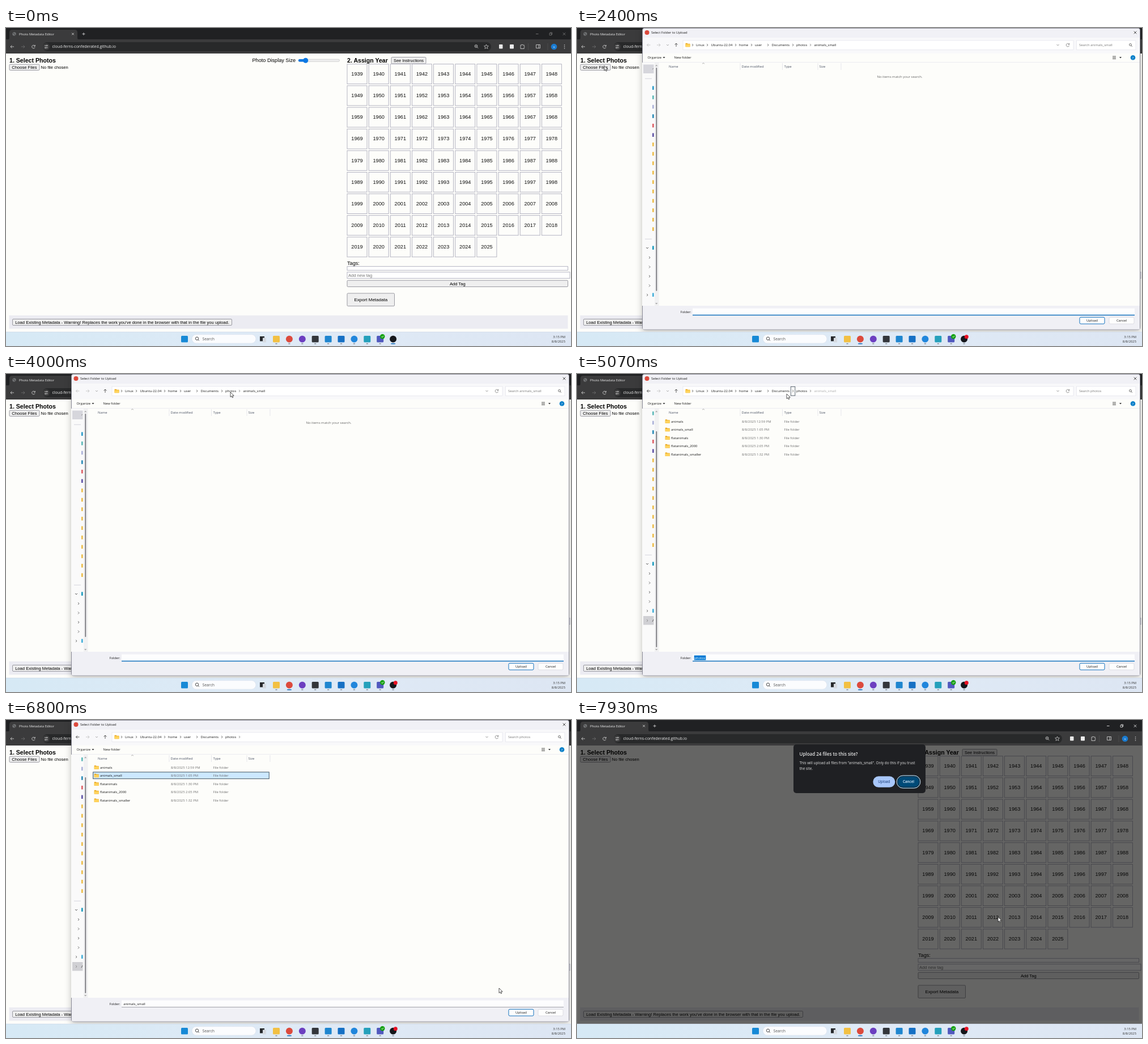
Write an HTML page that moves like this. It is 997 px wide and 561 px high and loops after 8000 ms.

```html
<!DOCTYPE html>
<html lang="en">
<head>
<meta charset="utf-8">
<title>Photo Metadata Editor</title>
<style>
html, body { margin: 0; width: 100%; height: 100%; overflow: hidden; background: #fff; }
svg { display: block; width: 100vw; height: 100vh; }
text { white-space: pre; }
.ui { font-family: "Open Sans", "Noto Sans", sans-serif; }
.page { font-family: "Liberation Sans", Arial, sans-serif; }
</style>
</head>
<body>
<svg id="stage" viewBox="0 0 997 561" preserveAspectRatio="none"></svg>
<script>
const LOOP = 8000;
const OPEN = 2150, NAVIGATE = 4100, SELECT = 6000, CLOSE = 7400, CONFIRM = 7580;
const PAPER = '#fdfdfa';

// Drawing helpers, all returning SVG markup
const rect = (x, y, w, h, fill, more = '') =>
  `<rect x="${x}" y="${y}" width="${w}" height="${h}" fill="${fill}" ${more}/>`;
const circle = (x, y, r, fill, more = '') => `<circle cx="${x}" cy="${y}" r="${r}" fill="${fill}" ${more}/>`;
const line = (d, color, width = 0.8, more = '') =>
  `<path d="${d}" fill="none" stroke="${color}" stroke-width="${width}" ${more}/>`;
const label = (cls, x, y, s, size, fill, more) =>
  `<text class="${cls}" x="${x}" y="${y}" font-size="${size}" fill="${fill}" ${more}>${s}</text>`;
const ui = (x, y, s, fill = '#1a1a1a', size = 5.9, more = '') => label('ui', x, y, s, size, fill, more);
const page = (x, y, s, size = 7.6, fill = '#000', more = '') => label('page', x, y, s, size, fill, more);
const middle = 'text-anchor="middle"', end = 'text-anchor="end"', bold = 'font-weight="bold"';
const phase = (from, to, content) => `<g data-from="${from}" data-to="${to}">${content}</g>`;
const group = (id, content) => `<g id="${id}">${content}</g>`;

const cross = (x, y, r, color) => line(`M${x - r} ${y - r}l${2 * r} ${2 * r}m0 ${-2 * r}l${-2 * r} ${2 * r}`, color);
const arrow = (x, y, dir, color) =>
  line(`M${x - 3} ${y}h6M${x + 3 * dir - 2.5 * dir} ${y - 2.5}l${2.5 * dir} 2.5l${-2.5 * dir} 2.5`, color);
const reload = (x, y, color) =>
  line(`M${x + 2.6} ${y - 1}a2.8 2.8 0 1 0 0 2.2M${x + 2.8} ${y - 3.2}v2.4h-2.4`, color);
const chevron = (x, y, color = '#333') => line(`M${x - 1} ${y - 2}l2 2l-2 2`, color, 0.7);
const down = (x, y, color = '#333') => line(`M${x - 2} ${y - 1}l2 2l2 -2`, color, 0.8);
const caret = (x, y) => `<path d="M${x - 2} ${y - 1}h4l-2 2.4z" fill="#333"/>`;
const magnifier = (x, y, color, r = 2.4) =>
  line(`M${x + r * .7} ${y + r * .7}l2 2`, color) + circle(x, y, r, 'none', `stroke="${color}" stroke-width=".8"`);
const folder = (x, y) =>
  `<path d="M${x - 4} ${y - 3.3}h3l1 1h4v5.6h-8z" fill="#e9a820"/>` + rect(x - 4, y - 1.4, 8, 4.6, '#ffd35c', 'rx=".6"');
const button = (x, y, w, h, s, size = 7.6) =>
  rect(x, y, w, h, '#efefef', 'rx="1.5" stroke="#85858f" stroke-width=".8"') +
  page(x + w / 2, y + h / 2 + size * .35, s, size, '#000', middle);

function browserBar() {
  const controls = color => line('M935 10.5h4.5', color) +
    line('M959 9.2h3.5v3.5h-3.5zM960.2 9v-1h3.5v3.5h-1', color, .7) + cross(985, 10.5, 2.2, color);
  const light = '#d8d8d8';
  return rect(0, 0, 997, 45, '#202123') +
    '<path d="M2 21q4 0 4-4v-9q0-5 5-5h110q5 0 5 5v9q0 4 4 4z" fill="#3b3b3c"/>' +
    rect(0, 20, 997, 25, '#3b3b3c') + rect(65, 25, 791, 16, '#28292a', 'rx="8"') +
    circle(14.5, 10.5, 3.2, '#707274') + line('M12 9q3 0 3 2t2 2', '#3b3b3c', .8) +
    ui(23, 12.8, 'Photo Metadata Editor', '#eee') +
    cross(118, 10.5, 1.8, '#eee') + line('M134.5 10.5h5m-2.5-2.5v5', '#ddd') +
    phase(0, 1850, controls('#858585')) + phase(1850, OPEN, controls('#fff')) +
    phase(OPEN, CLOSE, controls('#858585')) + phase(CLOSE, LOOP, controls('#fff')) +
    arrow(11, 33, -1, light) + arrow(30, 33, 1, '#737373') + reload(48.5, 33, light) +
    circle(71, 33, 6, '#3b3b3c') +
    line('M68 31.2h3m2 0h1M68 34.8h1m2 0h3', light) +
    circle(72, 31.2, 1, 'none', `stroke="${light}" stroke-width=".7"`) +
    circle(70, 34.8, 1, 'none', `stroke="${light}" stroke-width=".7"`) +
    ui(81.5, 35.4, 'cloud-ferns-confederated.github.io', '#eee', 6.95) +
    magnifier(829.5, 32, light) + line('M828.3 32h2.4m-1.2-1.2v2.4', light, .5) +
    line('M847.5 29l1.1 2.6 2.8.2-2.1 1.8.7 2.8-2.5-1.5-2.5 1.5.7-2.8-2.1-1.8 2.8-.2z', light, .7) +
    rect(870, 29, 6.5, 7.5, '#e8e8e8', 'rx="1"') + rect(889, 29, 7, 7.5, '#eee', 'rx="1"') +
    line('M908 30h2.2q0-2 2 0h2v2.2q2 .8 0 2v2.3h-6.2z', light) +
    line('M921.5 27v12M956 27v12', '#5a5a5a', .6) +
    line('M935.5 29.5h7v6h-7zM940 29.5v6', light) +
    circle(967, 33, 5.3, '#1a7bd0') + ui(967, 34.8, 'u', '#fff', 5, middle) +
    [30, 33, 36].map(y => circle(985.5, y, .75, light)).join('');
}

function webPage() {
  let years = '';
  for (let i = 0; i < 87; i++) {
    const x = 602 + i % 10 * 38.15, y = 63.7 + Math.floor(i / 10) * 38.15;
    years += rect(x, y, 35, 35, PAPER, 'stroke="#a3a3b5" stroke-width=".8"') +
      page(x + 17.5, y + 20.3, 1939 + i, 9.2, '#111', middle);
  }
  const field = 'stroke="#a3a3b5" stroke-width=".8"';
  return rect(0, 45, 997, 492, PAPER) +
    page(6, 61, '1. Select Photos', 10.6, '#000', bold) +
    button(6, 64, 53, 10.5, 'Choose Files') + page(61.5, 72, 'No file chosen') +
    page(434.5, 60.3, 'Photo Display Size', 9.13) +
    rect(516, 55.2, 72.5, 4, '#efefef', 'rx="2" stroke="#bbb" stroke-width=".6"') +
    rect(516, 55, 13, 4.4, '#0b78e3', 'rx="2"') + circle(528.7, 57.2, 4.5, '#0b78e3') +
    page(602, 61, '2. Assign Year', 10.6, '#000', bold) +
    button(680, 51.5, 61, 11.5, 'See Instructions', 7.4) + years +
    page(602, 418, 'Tags:', 9.13) + rect(602, 420.7, 389.5, 6.6, '#fff', field) +
    rect(602, 430.7, 393, 11, '#fff', field) + page(604, 438.8, 'Add new tag', 7.6, '#757575') +
    button(602, 445.2, 389.5, 11.3, 'Add Tag') + button(602, 468, 83.5, 22.5, 'Export Metadata', 8) +
    rect(5.5, 507, 986, 23.5, '#ececf2') +
    button(11.5, 513.5, 387, 11, "Load Existing Metadata - Warning! Replaces the work you've done in the browser with that in the file you upload.");
}

function taskbar() {
  const dash = (x, w, color) => rect(x - w / 2, 556.3, w, 1.5, color, 'rx=".7"');
  const square = (x, color) => rect(x - 6, 543, 12, 11.5, color, 'rx="1.5"');
  const round = (x, color) => circle(x, 548.7, 6, color);
  const apps = [['#f2c043', square], ['#dc4a3d', round], ['#6c3fc0', round], ['#33363b', square],
    ['#1f86cf', square], ['#1670c4', square], ['#2186dc', round], ['#25a0bb', square], ['#5159bf', square], ['#15171c', round]];
  const at = i => 477 + i * 22.9;
  return '<linearGradient id="bar"><stop stop-color="#d6e9f5"/><stop offset=".5" stop-color="#dfeaf6"/>' +
    '<stop offset="1" stop-color="#dde6f3"/></linearGradient>' +
    rect(0, 536, 997, 25, 'url(#bar)') + line('M0 536.3h997', '#ccd5e2', .6) +
    square(315, '#1789d6') + rect(328, 540.7, 113, 15.5, '#fbfcfe', 'rx="7.7" stroke="#d0d9e6" stroke-width=".5"') +
    magnifier(337, 547.8, '#222', 2.7) + ui(346.5, 551, 'Search', '#555', 6.8) +
    rect(448, 544, 8, 8.5, '#26282b') + rect(453, 546.5, 6, 8, '#d6dae0') +
    apps.map(([color, shape], i) => shape(at(i), color) + dash(at(i), 3.5, '#858d98')).join('') +
    circle(664.3, 544.2, 4.2, '#13a10e') + line('M662.4 544.3l1.4 1.4 2.5-2.8', '#fff', .9) +
    phase(0, 900, dash(at(9), 8, '#1971c2')) + phase(1850, LOOP, dash(at(1), 8, '#1971c2')) +
    phase(900, LOOP, circle(687.3, 544.8, 3.5, '#e81123')) +
    ui(987, 546.8, '3:15 PM', '#333', 5.8, end) + ui(987, 554.8, '8/8/2025', '#333', 5.8, end);
}

function sidebar() {
  const colors = ['#2799c9', '#59b7b7', '#aab0d8', '#2487b5', '#dd5b62', '#5c50a5', ...Array(10).fill('#edbc45')];
  const icons = colors.map((c, i) => rect(133, 102.5 + i * 16.6, 2.6, 6.5, c)).join('');
  const tree = down(124, 388) + rect(133, 384.5, 2.6, 6.5, '#1799bd') +
    [405, 421.5, 438, 454.5].map(y => chevron(128, y)).join('') + chevron(124, 471) + rect(133, 467.5, 2.6, 6.5, '#40acd8');
  const thumb = (y, h) => rect(139.4, y, 1.8, h, '#77777c', 'rx=".9"');
  return '<clipPath id="sideClip"><rect x="115" y="61" width="30" height="429"/></clipPath><g clip-path="url(#sideClip)">' +
    rect(115, 61, 30, 429, '#fafafa') +
    group('sideItems', rect(117, 64.5, 18.5, 15.5, '#d6d6dc') + line('M133 73l2-2', '#777') +
      line('M120 89.3h12M120 372.3h12', '#ccccd6') + icons + tree +
      phase(NAVIGATE, LOOP, rect(117, 480, 18.5, 15.5, '#d0d0d4') + chevron(124, 488, '#777') + line('M133 490l2-4', '#444'))) +
    rect(137, 61, 7.5, 429, '#f1f1f2') +
    '<path d="M138 67.3l2.2-2.6 2.2 2.6zM138 485l2.2 2.6 2.2-2.6z" fill="#aaa"/>' +
    phase(0, NAVIGATE, thumb(70, 394)) + phase(NAVIGATE, LOOP, thumb(101, 381)) + '</g>';
}

function folderDialog() {
  const crumbs = [[210, 'Linux', 204], [236.5, 'Ubuntu-22.04', 230], [286, 'home', 280], [314, 'user', 308],
    [343.5, 'Documents', 337], [387, 'photos', 381]];
  const rows = [['animals', '12:59'], ['animals_small', '1:05'], ['flatanimals', '1:30'],
    ['flatanimals_2000', '2:05'], ['flatanimals_smaller', '1:32']];
  const list = rows.map(([name, time], i) => {
    const y = 83.5 + i * 14.55;
    return folder(159.7, y) + ui(166, y + 2.1, name) + ui(291, y + 2.1, `8/8/2025 ${time} PM`, '#707070') +
      ui(365.5, y + 2.1, 'File folder', '#707070');
  }).join('');
  const row = (fill, stroke) => rect(153.7, 91.9, 310.5, 11.8, fill, `stroke="${stroke}" stroke-width=".9"`);
  const underline = (color, w) => line('M204 506.5h780', color, w);
  const cancelled = 'rx="2" stroke="#d2d2da" stroke-width=".7"';
  return rect(115.5, .5, 878, 531.5, '#f1f1f6', 'rx="3" stroke="#8c8c98" stroke-width="1"') +
    rect(116, 17, 877, 28, '#f8f8fa') + rect(116, 44.5, 877, 445.5, PAPER) + line('M116 60.5h877', '#e6e6ee', .7) +
    phase(0, CLOSE, circle(123.5, 8, 4, '#dc4a3d') + ui(131, 10.2, 'Select Folder to Upload')) +
    phase(CLOSE, LOOP, ui(119, 10.2, 'Select Folder to Upload')) + cross(985, 8, 2.3, '#222') +
    phase(0, NAVIGATE, arrow(126.5, 30, -1, '#bbb')) + phase(NAVIGATE, LOOP, arrow(126.5, 30, -1, '#333')) +
    arrow(144, 30, 1, '#bbb') + down(160, 30, '#999') + line('M175 33v-6m-2.5 2.5l2.5-2.5 2.5 2.5', '#333') +
    rect(187, 22, 689, 16.5, '#fff', 'stroke="#e3e3ea" stroke-width=".7"') +
    rect(881.5, 22, 104.5, 16.5, '#fff', 'stroke="#e3e3ea" stroke-width=".7"') +
    folder(195.5, 30) + crumbs.map(([x, s, sep]) => chevron(sep, 30) + ui(x, 32.1, s)).join('') + chevron(412, 30, '#666') +
    down(848.5, 30, '#777') + reload(866, 30, '#777') + magnifier(976.5, 29.5, '#444', 1.9) +
    phase(0, NAVIGATE, ui(418.5, 32.1, 'animals_small') + ui(886, 32.1, 'Search animals_small', '#777') +
      ui(569.5, 87.8, 'No items match your search.', '#666', 6, middle)) +
    phase(NAVIGATE, LOOP, ui(886, 32.1, 'Search photos', '#777')) +
    phase(NAVIGATE, SELECT, ui(418.5, 32.1, 'animals_small', '#aaa') +
      rect(377.3, 22.3, 7.5, 15.8, 'none', 'stroke="#4a5560" stroke-width=".9"')) +
    ui(124.5, 54.3, 'Organize') + caret(153.5, 52) + ui(171.5, 54.3, 'New folder') +
    line('M945 50h6m-6 2.2h6m-6 2.2h6', '#333') + caret(959, 52) +
    circle(981, 52.3, 4.3, '#087fc9') + ui(981, 54.5, '?', '#fff', 5.8, middle) +
    [[162, 'Name'], [290.5, 'Date modified'], [365.5, 'Type'], [427.5, 'Size']].map(([x, s]) => ui(x, 69.7, s, '#4d5566')).join('') +
    line('M288 62v12M362.5 62v12M425 62v12M466 62v12', '#dcdce4', .7) + line('M221 63.2l2-1.5 2 1.5', '#777', .6) +
    sidebar() +
    phase(5750, SELECT, row('#e5f3ff', '#e5f3ff')) + phase(SELECT, CLOSE, row('#cce8ff', '#33434f')) +
    phase(CLOSE, LOOP, row('#d9d9d9', '#d9d9d9')) +
    phase(NAVIGATE, LOOP, list) +
    rect(116, 490, 877, 41.5, '#f0f0f5') + ui(201.5, 503, 'Folder:', '#1a1a1a', 5.9, end) +
    rect(204, 494.5, 780, 12, '#fdfdfe') +
    phase(0, SELECT, underline('#1271bd', 1.4)) + phase(SELECT, LOOP, underline('#8b8b94', .8)) +
    phase(NAVIGATE, SELECT, rect(206.7, 496.5, 20.6, 8.2, '#0078d4') + ui(207.2, 502.7, 'photos', '#fff')) +
    phase(SELECT, LOOP, ui(207.2, 502.7, 'animals_small')) +
    rect(887, 510.3, 44, 11.7, '#fdfdfd', 'rx="2" stroke="#1271bd" stroke-width="1"') +
    phase(7030, LOOP, rect(887, 510.3, 44, 11.7, '#cfe6f8', 'rx="2" stroke="#1271bd" stroke-width="1"')) +
    rect(939, 510.3, 44, 11.7, '#fdfdfd', cancelled) +
    ui(909, 518.3, 'Upload', '#1a1a1a', 5.9, middle) + ui(961, 518.3, 'Cancel', '#1a1a1a', 5.9, middle);
}

function confirmDialog() {
  return rect(0, 45, 997, 491, '#000', 'opacity=".6"') +
    rect(382, 43, 233, 86, '#1f2023', 'rx="5"') +
    ui(392.5, 62.8, 'Upload 24 files to this site?', '#e8e8e8', 8, 'font-weight="600"') +
    ui(392.5, 77.7, 'This will upload all files from "animals_small". Only do this if you trust', '#e3e3e3', 6.35) +
    ui(392.5, 87.9, 'the site.', '#e3e3e3', 6.35) +
    rect(522.3, 99.3, 39, 19.5, '#a8c7fa', 'rx="9.7"') + ui(541.8, 111.3, 'Upload', '#0b2f6b', 6.3, middle) +
    rect(564.2, 98, 41.6, 22.2, '#004a77', 'rx="11" stroke="#d7e8f7" stroke-width="1"') +
    rect(565.7, 99.5, 38.6, 19.2, 'none', 'rx="9.6" stroke="#1f2023" stroke-width=".8"') +
    ui(585, 111.3, 'Cancel', '#e3f1ff', 6.3, middle + ' font-weight="600"');
}

const stage = document.getElementById('stage');
stage.innerHTML = webPage() + browserBar() + group('confirm', confirmDialog()) +
  group('picker', folderDialog()) + taskbar() +
  group('cursor', '<path d="M0 0v8.6l2-1.8 1.3 3 1.5-.7-1.3-2.9h2.7z" fill="#fff" stroke="#111" stroke-width=".7"/>');

const byId = id => document.getElementById(id);
const picker = byId('picker'), confirmBox = byId('confirm'), cursor = byId('cursor'), sideItems = byId('sideItems');
const phases = [...stage.querySelectorAll('[data-from]')];
picker.style.filter = 'drop-shadow(0 3px 6px rgba(0,0,0,.25))';

// Time, x, y of the pointer tip
const route = [[900, 684, 548], [1600, 48, 66.5], [2550, 48, 66.5], [3050, 144, 97], [3450, 144, 97], [3950, 396, 32],
  [4400, 396, 32], [5000, 370, 35], [5300, 370, 35], [5800, 190, 97], [6250, 190, 97], [6800, 870, 473],
  [7080, 907.5, 518], [7500, 907.5, 518], [7930, 743, 347.5]];
const clamp = v => Math.min(1, Math.max(0, v));
const smooth = v => v * v * (3 - 2 * v);

function pointerAt(t) {
  const next = route.findIndex(p => p[0] > t);
  if (next < 0) return route[route.length - 1].slice(1);
  if (next === 0) return route[0].slice(1);
  const [t0, x0, y0] = route[next - 1], [t1, x1, y1] = route[next];
  const k = smooth((t - t0) / (t1 - t0));
  return [x0 + (x1 - x0) * k, y0 + (y1 - y0) * k];
}

function setVisible(node, visible) { node.style.display = visible ? '' : 'none'; }

function draw(t) {
  for (const node of phases) setVisible(node, t >= +node.dataset.from && t < +node.dataset.to);

  const opened = clamp((t - OPEN) / 180), closed = clamp((t - CLOSE) / 145);
  const alpha = opened * (1 - closed);
  const scale = 1 - .06 * (1 - opened) ** 2 - .069 * closed;
  setVisible(picker, alpha > 0);
  picker.setAttribute('opacity', alpha);
  picker.setAttribute('transform', `translate(554 266) scale(${scale}) translate(-554 -266)`);
  sideItems.setAttribute('transform', `translate(0 ${t < NAVIGATE ? 0 : -53})`);

  const asked = clamp((t - CONFIRM) / 150);
  setVisible(confirmBox, asked > 0);
  confirmBox.setAttribute('opacity', asked);

  setVisible(cursor, t >= route[0][0]);
  cursor.setAttribute('transform', `translate(${pointerAt(t)})`);
}

const start = performance.now();
function tick() {
  draw((performance.now() - start) % LOOP);
  requestAnimationFrame(tick);
}
tick();
</script>
</body>
</html>
```
